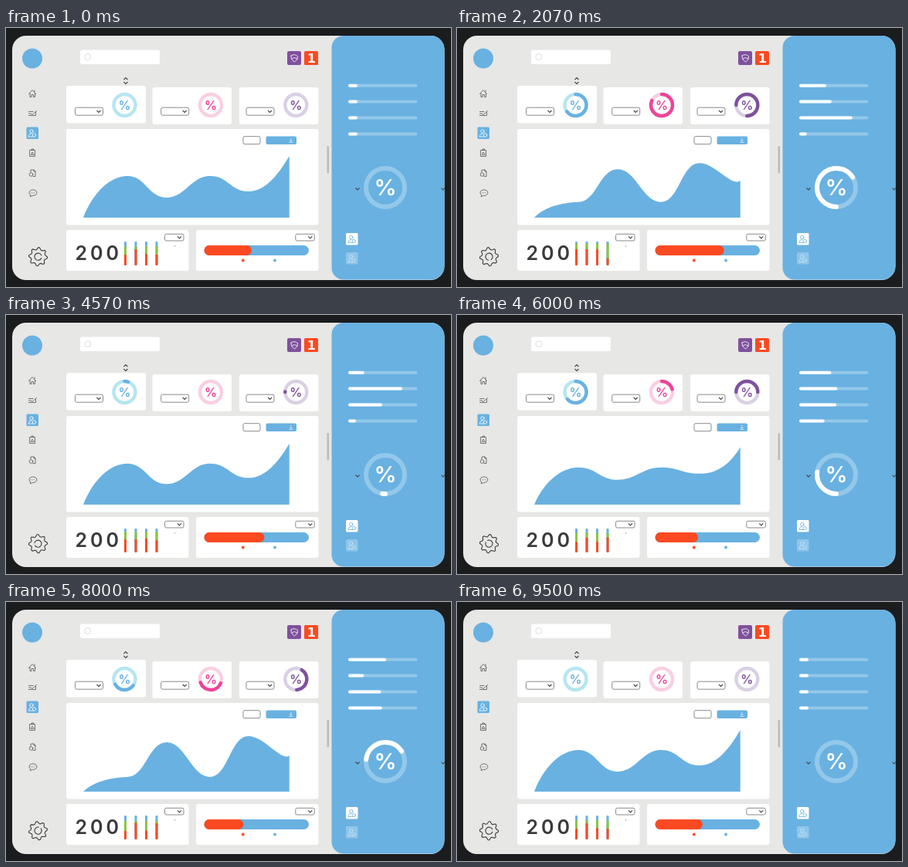
An HTML page for the animation above (9.57 s loop, 576 by 336 pixels).

```html
<!DOCTYPE html>
<html lang="en">
<head>
<meta charset="utf-8">
<style>
html, body { margin: 0; width: 100%; height: 100%; overflow: hidden; background: #1b1c1e; }
svg { display: block; width: 576px; height: 336px; }
text { font-family: Inter, "Liberation Sans", sans-serif; text-anchor: middle; }
.line { fill: none; stroke: #555; stroke-width: .8; stroke-linecap: round; stroke-linejoin: round; }
.pale { stroke: #fff; }
.box { fill: #fff; stroke: #8a8a8a; stroke-width: 1; }
.chev { fill: none; stroke: #444; stroke-width: 1.1; }
.round { fill: none; stroke-linecap: round; }
</style>
</head>
<body>
<svg id="stage" viewBox="0 0 576 336">
  <defs>
    <g id="user">
      <circle cx="-1" cy="-2.5" r="2.2"/>
      <path d="M-4.5 4.5V3Q-4 .5-1 .5M-4.5 4.5H1"/>
      <circle cx="2.5" cy="2.5" r="2.2"/>
    </g>
  </defs>
  <rect x="8" y="10" width="559.5" height="317" rx="18" fill="#e7e7e5"/>
  <path d="M437 10H550a17.5 17.5 0 0 1 17.5 17.5V309a17.5 17.5 0 0 1-17.5 17.5H437a15.5 15.5 0 0 1-15.5-15.5V25.500a15.500 15.500 0 0 1 15.500-15.500Z" fill="#69b1e1"/>
  <circle cx="34" cy="39.500" r="13" fill="#69b1e1"/>

  <rect x="96" y="28.500" width="103" height="18.500" rx="2.500" fill="#fff"/>
  <circle cx="105.800" cy="37.500" r="4" fill="none" stroke="#d5d5d5" stroke-width=".8"/>
  <rect x="364" y="30" width="18" height="18" rx="2" fill="#7f519d"/>
  <path class="line pale" d="M369 36Q373 33 377.500 36.500Q378.500 41 373.500 44Q368.500 41 369 36ZM370 40L373 38.500L377 40"/>
  <rect x="386" y="30" width="18" height="18" rx="1.500" fill="#fb4a22"/>
  <text x="395.200" y="45" font-size="16" font-weight="700" fill="#fff" style="font-family:'DejaVu Sans',sans-serif">1</text>
  <path class="chev" d="M152.500 67l2.500-2.500 2.500 2.500M152.500 70l2.500 2.500 2.500-2.500"/>
  <rect x="415.500" y="153" width="2.600" height="35.500" rx="1.300" fill="#bcbcbc"/>

  <g class="line">
    <path d="M29.500 85.500L34 80.500L38.500 85.500M31 84.500V89.500H33V86.500H35.500V89.500H37.500V84.500M37 83V81"/>
    <path d="M29.500 113.500H38.500V109M29.500 108.500H35M29.500 111H32L34 112.500L39.500 107.500"/>
    <path d="M31 158.500H37.500V166.500H31ZM33 158.500V157H35.500V158.500M32.500 164L34 161L36 164Z"/>
    <path d="M32 187V184H36L38 186V192.500H35M36 184V186H38"/><circle cx="32.500" cy="190" r="2.300"/>
    <path d="M31.500 216.500A5 3.800 0 1 1 34.500 217.500L31.500 218.500ZM32.500 213.800h.1M34.500 213.800h.1M36.500 213.800h.1"/>
  </g>
  <rect x="26.500" y="128.500" width="15.500" height="15.500" rx="1.500" fill="#69b1e1"/>
  <use href="#user" class="line pale" x="34" y="136.500"/>
  <g id="gear" class="line" style="stroke:#3d3d3d;stroke-width:1.1"></g>

  <g id="cards" fill="#fff"></g>
  <g id="drops"></g>
  <rect class="box" x="307" y="140.700" width="22" height="10" rx="2"/>
  <rect x="336.500" y="140.500" width="39.500" height="10.500" rx="2" fill="#69b1e1"/>
  <path class="line pale" opacity=".7" d="M368.800 143V147M367.300 145.700l1.500 1.500 1.500-1.500M366.500 148.500H371"/>
  <path id="area" fill="#69b1e1"/>

  <text x="119.800" y="301" font-size="25" font-weight="600" letter-spacing="4" fill="#3b3b3d">200</text>
  <circle cx="218.500" cy="283" r=".8" fill="#999"/>
  <g id="columns"></g>
  <rect x="256.500" y="282" width="135.500" height="13" rx="6.500" fill="#69b1e1"/>
  <rect id="split" x="256.500" y="282" height="13" rx="6.500" fill="#fb4a22"/>
  <circle cx="306.800" cy="301.500" r="1.900" fill="#fb4a22"/>
  <circle cx="348" cy="301.500" r="1.900" fill="#69b1e1"/>

  <g id="sliders"></g>
  <g id="rings"></g>
  <path class="chev" d="M452.500 207.500l2.500 2.500 2.500-2.500M563.500 207.500l2.300 2.500 2-2.500"/>
  <rect x="440" y="266" width="15.500" height="15.500" rx="1.500" fill="#fff"/>
  <use href="#user" class="line" style="stroke:#69b1e1" x="447.700" y="274"/>
  <rect x="440" y="291" width="15.500" height="15.500" rx="1.500" fill="#8fc6ea"/>
  <use href="#user" class="line" style="stroke:#c8e2f4" x="447.700" y="299"/>
</svg>
<script>
const LOOP = 9570, BEATS = [0, 2320, 4750, 7400, 9350];
const $ = id => document.getElementById(id);

function add(parent, tag, attrs, text = '') {
  const el = document.createElementNS('http://www.w3.org/2000/svg', tag);
  for (const k in attrs) el.setAttribute(k, attrs[k]);
  el.textContent = text;
  return $(parent).appendChild(el);
}
const set = (el, attrs) => { for (const k in attrs) el.setAttribute(k, attrs[k]); };
const mix = (a, b, k) => a + (b - a) * k;
const linear = k => k;
const smooth = k => (1 - Math.cos(Math.PI * k)) / 2;

function track(t, times, values, ease = linear) {
  if (t >= times.at(-1)) return values.at(-1);
  const i = times.findIndex(x => x > t) - 1;
  return mix(values[i], values[i + 1], ease((t - times[i]) / (times[i + 1] - times[i])));
}

// Static repeats
for (const [x, y, width, height] of [[78, 75, 103, 48.5], [189.5, 77, 102.5, 48], [302, 77, 102.5, 48],
  [78, 131, 326.5, 124.5], [78, 262, 158.5, 53], [246, 262, 158.5, 53]])
  add('cards', 'rect', { x, y, width, height, rx: 3 });

for (const [x, y, width, height] of [[89.5, 103.2, 36, 10], [200.7, 103.2, 36, 10], [311, 103.2, 36, 10],
  [205.5, 267.3, 24.5, 8.7], [374.8, 267.3, 24.5, 8.7]]) {
  add('drops', 'rect', { class: 'box', x, y, width, height, rx: 2 });
  add('drops', 'path', { class: 'chev', d: `M${x + width - 8} ${y + height / 2 - 1.2}l2.500 2.500 2.500-2.500` });
}

// Gear with eight teeth
const teeth = Array.from({ length: 32 }, (_, i) => {
  const r = i % 4 < 2 ? 12 : 9.3, a = (i + (i % 2 ? -.12 : .12)) * Math.PI / 16;
  return `${(r * Math.cos(a)).toFixed(2)} ${(r * Math.sin(a)).toFixed(2)}`;
});
add('gear', 'path', { d: `M${teeth.join('L')}Z` });
add('gear', 'path', { d: 'M4.300-1.800A4.600 4.600 0 1 0 4.300 1.800' });

// Rings: t0/end move the head of the arc, t1/start its tail
const rings = [
  { x: 153.5, y: 100, r: 14, w: 4.4, size: 16, turn: -90, ink: '#69b1e1', pale: '#b5e6f1',
    headT: [0, 1200, 2400, 3400, 4440, 6080], head: [0, .65, .65, 0, 0, .67], tailT: [6900, 9000], peak: .67 },
  { x: 265, y: 100, r: 14, w: 4.4, size: 16, turn: -90, ink: '#ee4498', pale: '#f9cfe2',
    headT: [0, 1300, 2600, 4500, 5450, 7300], head: [0, .82, .82, 0, 0, .7], tailT: [7200, 9000], peak: .7 },
  { x: 375.3, y: 100, r: 14, w: 4.4, size: 16, turn: 180, ink: '#7f519d', pale: '#dad0e5',
    headT: [0, 1200, 2300, 3450, 4550, 6700], head: [0, .75, .75, 0, 0, .74], tailT: [7150, 9000], peak: .74 },
  { x: 491, y: 207, r: 25, w: 6, size: 29, turn: 90, ink: '#fff', pale: '#93c8ea',
    headT: [0, 1000, 3340, 4620, 5300, 7000], head: [0, .66, .66, 0, 0, .66], tailT: [7300, 9020], peak: .66 }
];
for (const g of rings) {
  const base = { cx: g.x, cy: g.y, r: g.r, fill: 'none', 'stroke-width': g.w };
  add('rings', 'circle', { ...base, stroke: g.pale });
  g.arc = add('rings', 'circle', { ...base, class: 'round', stroke: g.ink, pathLength: 1,
    transform: `rotate(${g.turn} ${g.x} ${g.y})` });
  add('rings', 'text', { x: g.x, y: g.y + g.size * .355, 'font-size': g.size, 'font-weight': 600, fill: g.ink }, '%');
}

const sliders = [
  [455, 480.8, 462.5, 509, 455], [455, 488.5, 515, 467, 455],
  [455, 518.7, 484.5, 499, 455], [455, 452.5, 453, 501, 455]
].map((ends, i) => {
  const y = 74.7 + i * 20.9, base = { class: 'round', x1: 445, x2: 530.5, y1: y, y2: y, 'stroke-width': 4 };
  add('sliders', 'line', { ...base, stroke: '#93c8ea' });
  return { ends, el: add('sliders', 'line', { ...base, stroke: '#fff' }) };
});

const columns = [
  [294, 286, 291, 298, 294], [287, 287, 291, 286, 287],
  [293, 286, 290, 298, 293], [294, 299, 292, 284, 294]
].map((tops, i) => {
  const x = 153 + i * 13.5;
  add('columns', 'rect', { x, y: 277, width: 3, height: 31, rx: 1.3, fill: '#69b1e1' });
  return {
    tops,
    green: add('columns', 'rect', { x, width: 3, fill: '#8cc63f' }),
    red: add('columns', 'rect', { x, width: 3, rx: 1.2, fill: '#fb4a22' })
  };
});

function areaPath(k) {
  const p = (xa, ya, xb, yb) => `${mix(xa, xb, k)} ${mix(ya, yb, k)} `;
  const knots = [[157, 192, 227], [208, 220, 182], [264, 192, 227], [314, 212, 174]]
    .map(([x, a, b]) => [x, mix(a, b, k)]);
  let d = `M100 246C${p(113, 212, 113, 233)}${p(136, 192, 135, 228)}157 ${knots[0][1]}`;
  for (let i = 1; i < knots.length; i++) {
    const [x0, y0] = knots[i - 1], [x, y] = knots[i];
    d += `C${x0 + 24} ${y0} ${x - 24} ${y} ${x} ${y}`;
  }
  return d + `C${p(333, 212, 334, 174)}${p(350, 195, 357, 208)}${p(366.7, 166, 366.7, 199)}V246Z`;
}

function draw(t) {
  $('gear').setAttribute('transform', `translate(41.500 296.700) rotate(${t / LOOP * 360})`);

  const k = track(t, [0, 2350, 3250, 4700, 5300, 7950, 9480], [0, 1, 1, 0, 0, 1, 0], smooth);
  $('area').setAttribute('d', areaPath(k));

  for (const g of rings) {
    const head = track(t, g.headT, g.head);
    const tail = track(t, [0, ...g.tailT], [0, 0, g.peak]);
    const length = head - tail;
    set(g.arc, {
      'stroke-dasharray': `${Math.max(length, 0)} 2`,
      'stroke-dashoffset': -tail,
      visibility: length > .002 ? 'visible' : 'hidden'
    });
  }

  for (const s of sliders) s.el.setAttribute('x2', track(t, BEATS, s.ends) - 2);

  const cap = track(t, BEATS, [283.5, 279, 281.5, 284, 283.5]);
  for (const c of columns) {
    const top = track(t, BEATS, c.tops);
    set(c.green, { y: cap, height: Math.max(0, top + 2 - cap) });
    set(c.red, { y: top, height: 308 - top });
  }

  $('split').setAttribute('width', track(t, [0, 3030, 6840, 9480], [318, 358.5, 299, 318]) - 256.5);
}

const began = performance.now();
function tick() {
  draw((performance.now() - began) % LOOP);
  requestAnimationFrame(tick);
}
tick();
</script>
</body>
</html>
```
